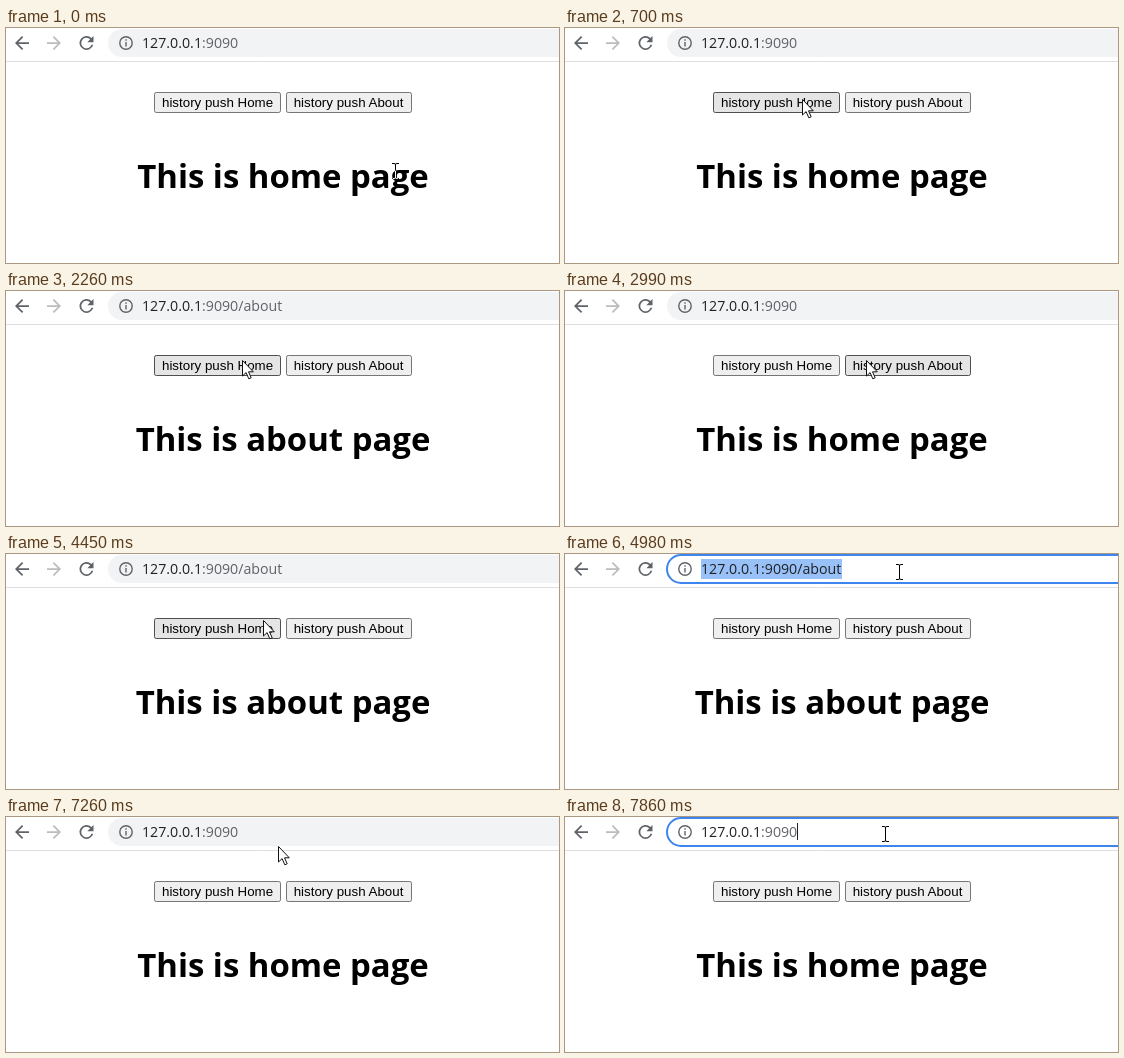
An HTML page that plays this animation: 553 by 235 pixels, repeating every 8000 ms.

```html
<!DOCTYPE html>
<html lang="en">
<head>
<meta charset="utf-8">
<title>History push demo</title>
<style>
  html, body { margin: 0; height: 100%; overflow: hidden; background: #fff; }
  svg { display: block; width: 553px; height: 235px; }
  text { white-space: pre; }
  #title { font: bold 32.9px "Open Sans", "Noto Sans", sans-serif; text-anchor: middle; }
  #url { font: 14.2px "Open Sans", "Noto Sans", sans-serif; fill: #202124; }
  .btn text { font: 13.333px "Liberation Sans", Arial, sans-serif; }
  .btn rect { fill: #efefef; stroke: #767676; }
  .btn.hover rect { fill: #e5e5e5; stroke: #4f4f4f; }
  .btn.down rect { fill: #f5f5f5; stroke: #8d8d8d; }
  #bar { fill: #f1f3f4; stroke-width: 2; }
  #bar.focus { fill: #fff; stroke: #3f85ee; }
  #beam { fill: none; stroke: #fff; mix-blend-mode: difference; }
</style>
</head>
<body>
<svg viewBox="0 0 553 235">
  <defs>
    <path id="shaft" d="M20 11H7.8l5.6-5.6L12 4l-8 8 8 8 1.4-1.4L7.8 13H20z"/>
  </defs>
  <rect width="553" height="235" fill="#fff"/>
  <path d="M0 33.5H553" stroke="#dcdee1"/>
  <use href="#shaft" fill="#5f6368" transform="translate(5.5 4.5) scale(.875)"/>
  <use href="#shaft" fill="#babcbe" transform="translate(58.5 4.5) scale(-.875 .875)"/>
  <path id="reload" fill="#5f6368" transform="translate(70 4.5) scale(.875)"
    d="M17.65 6.35A8 8 0 1 0 19.73 14h-2.08A6 6 0 1 1 16.22 7.78L13 11h7V4z"/>
  <path id="stop" d="M75.5 10l10 10m0-10l-10 10" stroke="#5f6368" stroke-width="1.8"/>
  <rect id="bar" x="102" y="1" width="480" height="28" rx="14"/>
  <g fill="none" stroke="#5f6368" stroke-width="1.4">
    <circle cx="120" cy="15" r="6.2"/>
    <path d="M120 14v4.5M120 11.2v1.5"/>
  </g>
  <rect id="select" x="136" y="5" height="20" fill="#98c1f8"/>
  <text id="url" x="136" y="20">127.0.0.1<tspan id="rest"></tspan></text>
  <path id="caret" d="M232.5 6V23" stroke="#202124"/>
  <g class="btn" id="home">
    <rect x="148.5" y="64.5" width="126" height="20" rx="1.8"/>
    <text x="156" y="79">history push Home</text>
  </g>
  <g class="btn" id="about">
    <rect x="280.5" y="64.5" width="125" height="20" rx="1.8"/>
    <text x="287.7" y="79">history push About</text>
  </g>
  <text id="title" x="277" y="160"></text>
  <path id="beam" d="M-3 -7.5H-1L.5 -7 2 -7.5H4M.5 -7V7M-3 7.5H-1L.5 7 2 7.5H4"/>
  <path id="arrow" d="M-.5 -.5V15l3.6-3.4 2.7 6.2 2.4-1-2.7-6H10.3z" fill="#fff" stroke="#111"/>
</svg>
<script>
const LOOP = 8000;
const el = id => document.getElementById(id);
const show = (id, on) => { el(id).style.display = on ? '' : 'none'; };
const within = (v, a, b) => v >= a && v < b;
const smooth = k => k * k * (3 - 2 * k);
const easeOut = k => 1 - (1 - k) ** 3;

// pointer glides: start, end, x, y
const glides = [
  [70, 830, 225, 72], [890, 1510, 304, 73],     // to Home, to About
  [1910, 2330, 232, 70], [2460, 2990, 302, 70], // to Home, to About
  [3580, 3980, 258, 68],                        // to Home
  [4450, 4710, 285, 18], [4850, 4980, 334, 18], // along the address bar
  [6060, 6320, 261, 49], [6320, 6590, 250, 70], // down to Home
  [7060, 7590, 320, 17]                         // back to the address bar
];
// each press flips the page on release
const presses = [1650, 2340, 3190, 6920], HOLD = 60;

function pointer(t) {
  let x = 389, y = 143;
  for (const [from, to, gx, gy] of glides) {
    const k = Math.min(1, Math.max(0, (t - from) / (to - from)));
    x += (gx - x) * smooth(k);
    y += (gy - y) * easeOut(k);
  }
  return [Math.round(x), Math.round(y)];
}

function draw(t) {
  const [x, y] = pointer(t);
  const down = presses.some(p => within(t, p, p + HOLD));
  const about = presses.filter(p => t >= p + HOLD).length % 2 === 1;
  const focus = within(t, 4850, 5790) || t >= 7590;
  const selected = focus && t < 7730;
  const loading = within(t, 5790, 5860);

  for (const [id, left, right] of [['home', 148, 275], ['about', 280, 406]]) {
    const over = within(x, left, right) && within(y, 64, 85);
    el(id).classList.toggle('hover', over);
    el(id).classList.toggle('down', over && down);
  }

  el('title').textContent = `This is ${about ? 'about' : 'home'} page`;
  el('rest').textContent = ':9090' + (about ? '/about' : '');
  el('rest').setAttribute('fill', selected ? '#202124' : '#5f6368');
  el('select').setAttribute('width', about ? 141 : 96);
  el('bar').classList.toggle('focus', focus);
  show('select', selected);
  show('caret', focus && !selected);
  show('reload', !loading);
  show('stop', loading);

  const overText = y < 30 || within(y, 126, 172);
  show('beam', overText);
  show('arrow', !overText);
  el(overText ? 'beam' : 'arrow').setAttribute('transform', `translate(${x} ${y})`);
}

const start = performance.now();
function tick() {
  draw((performance.now() - start) % LOOP);
  requestAnimationFrame(tick);
}
tick();
</script>
</body>
</html>
```
